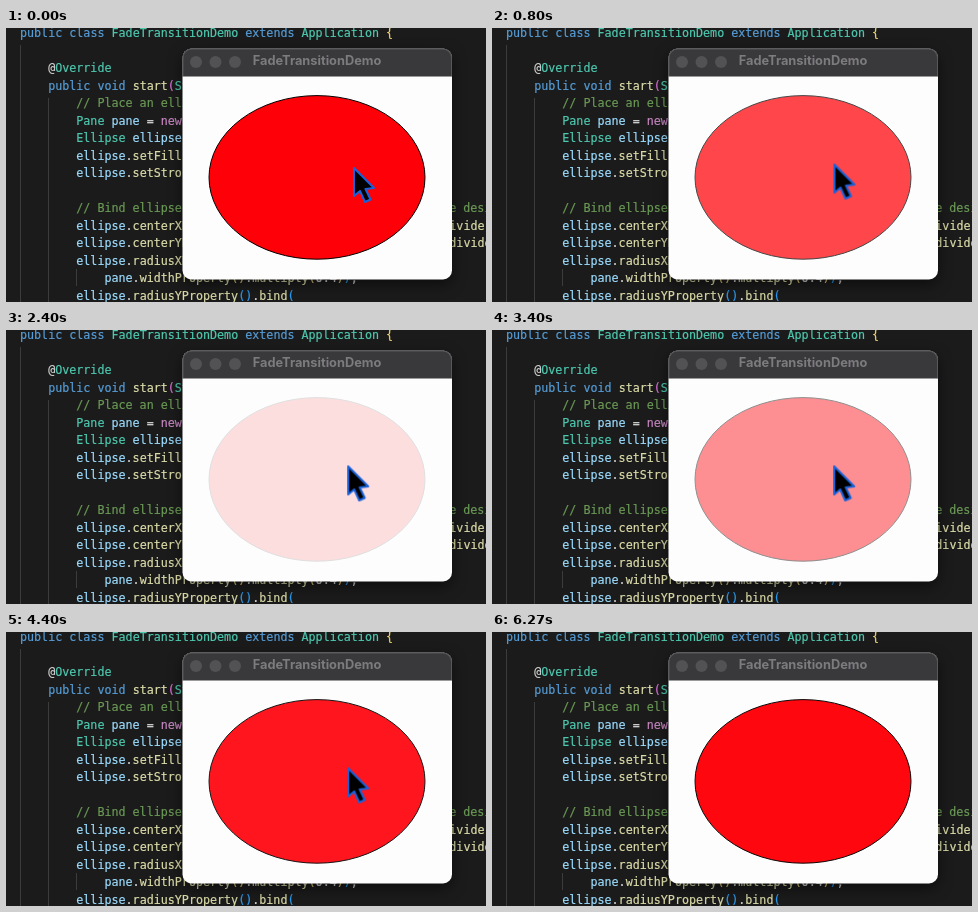
Write an HTML page that moves like this. It is 480 px wide and 274 px high and loops after 6.34 s.

```html
<!DOCTYPE html>
<html lang="en">
<head>
<meta charset="utf-8">
<title>Fade transition</title>
<style>
  html, body { margin: 0; width: 100%; height: 100%; overflow: hidden; background: #1b1b1b; }
  svg { display: block; width: 100vw; height: 100vh; }
  #code { font: 11.69px "DejaVu Sans Mono", monospace; color: #d4d4d4; white-space: pre; }
  #code text, #code tspan { fill: currentColor; stroke: currentColor; stroke-width: .2; }
  .k { color: #569cd6; }
  .t { color: #4ec9b0; }
  .v { color: #9cdcfe; }
  .f { color: #dcdcaa; }
  .c { color: #6a9955; }
  .n { color: #c586c0; }
  .b { color: #e9cf70; }
  .p { color: #da70d6; }
  .l { color: #2a9df4; }
  .guide { stroke: #3c3c3c; }
  .title { font: 700 12.8px Inter, sans-serif; fill: #7c7b7e; }
  .window { filter: drop-shadow(0 5px 7px rgba(0, 0, 0, .5)); }
  #oval { animation: fade 6340ms infinite; }
  #cursor { animation: move 6340ms linear infinite; }

  @keyframes fade {
    0% { opacity: 1; animation-timing-function: cubic-bezier(.3, .05, .7, .95); }
    35% { opacity: .12; }
    39.27% { opacity: .12; animation-timing-function: cubic-bezier(.3, .05, .7, .95); }
    75.4% { opacity: 1; }
    94.6% { opacity: 1; animation-timing-function: ease-in; }
    100% { opacity: .96; }
  }
  @keyframes move {
    0% { transform: translate(348px, 140px); }
    4.7% { transform: translate(342.6px, 136.7px); }
    30% { transform: translate(342.2px, 136.4px); }
    74.9% { transform: translate(342.2px, 136.4px); }
    78.86% { transform: translate(347px, 153px); }
    83.6%, 100% { transform: translate(356px, 280px); }
  }
</style>
</head>
<body>
<svg viewBox="0 0 480 274" preserveAspectRatio="none">
  <rect width="480" height="274" fill="#1b1b1b"/>
  <path class="guide" d="M14.5 17V274M42.5 70V274M70.5 241V258"/>
  <g id="code"></g>

  <g class="window">
    <rect x="176.5" y="20.5" width="269.5" height="231" rx="9" fill="#fdfdfd"/>
    <path d="M176.5 48.5V29.5a9 9 0 0 1 9-9H437a9 9 0 0 1 9 9V48.5Z" fill="#39383b"/>
    <path d="M177 48V30a9 9 0 0 1 9-9H436.5a9 9 0 0 1 9 9V48" fill="none" stroke="#58575a"/>
  </g>
  <g fill="#525154">
    <circle cx="190" cy="34" r="6"/>
    <circle cx="209.5" cy="34" r="6"/>
    <circle cx="229" cy="34" r="6"/>
  </g>
  <text class="title" x="311" y="37" text-anchor="middle">FadeTransitionDemo</text>

  <ellipse id="oval" cx="311" cy="149.4" rx="108" ry="81.8" fill="#ff0008" stroke="#000"/>
  <path id="cursor" d="M0 0V28L6 23L11 34L16.5 31.5L11.5 21L20 20Z"
        fill="#000" stroke="#1a62d9" stroke-width="2" stroke-linejoin="round"/>
</svg>
<script>
  // Each {x:text} span takes the colour class x; the number is the row.
  const bind = (prop, rest = "") => `    {v:ellipse}.{f:${prop}Property}{l:()}.{f:bind}{l:(}${rest}`;
  const half = side => `{v:pane}.{f:${side}Property}{b:()}.{f:divide}{b:(}2{b:)}{l:)};`;
  const rows = [
    [0, "{k:public} {k:class} {t:FadeTransitionDemo} {k:extends} {t:Application} {b:\u007b}"],
    [2, "@{t:Override}"],
    [3, "{k:public} {k:void} {f:start}{p:(}{t:Stage} {v:stage}{p:)}"],
    [4, "    {c:// Place an ellipse into the pane}"],
    [5, "    {t:Pane} {v:pane} = {n:new} {t:Pane}{l:()};"],
    [6, "    {t:Ellipse} {v:ellipse} = {n:new} {t:Ellipse}{l:()};"],
    [7, "    {v:ellipse}.{f:setFill}{l:(}{v:Color}.{v:RED}{l:)};"],
    [8, "    {v:ellipse}.{f:setStroke}{l:(}{v:Color}.{v:BLACK}{l:)};"],
    [10, "    {c:// Bind ellipse center and radii with the pane for the desired size}"],
    [11, bind("centerX", half("width"))],
    [12, bind("centerY", half("height"))],
    [13, bind("radiusX")],
    [14, "        {v:pane}.{f:widthProperty}{b:()}.{f:multiply}{b:(}0.4{b:)}{l:)};"],
    [15, bind("radiusY")]
  ];
  const ns = "http://www.w3.org/2000/svg";
  const code = document.getElementById("code");

  for (const [row, line] of rows) {
    const text = document.createElementNS(ns, "text");
    const indent = line.length - line.trimStart().length;
    text.setAttribute("x", 14 + 7.037 * ((row ? 4 : 0) + indent));
    text.setAttribute("y", 9 + 17.5 * row);
    for (const [, cls, word, plain] of line.trim().matchAll(/\{(\w):(\{|[^}]*)\}|([^{]+)/g)) {
      const span = document.createElementNS(ns, "tspan");
      if (cls) span.setAttribute("class", cls);
      span.textContent = cls ? word : plain;
      text.append(span);
    }
    code.append(text);
  }
</script>
</body>
</html>
```
